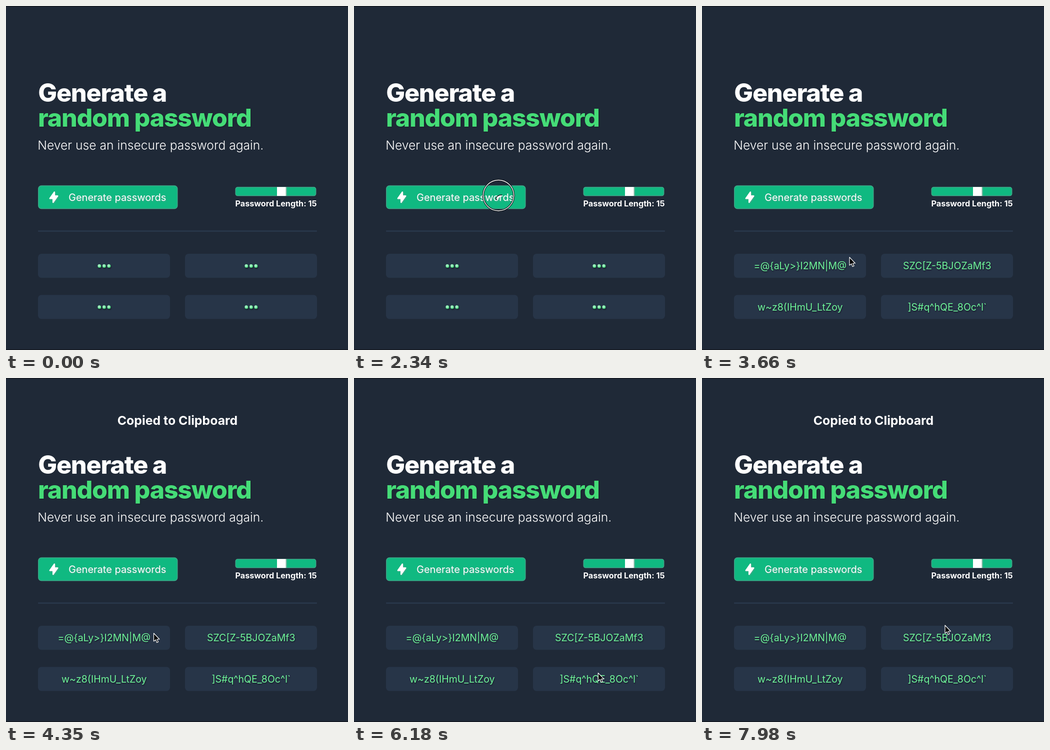
Animation, 684 px wide and 690 px high, one loop 8000 ms. Source, as an HTML page:

```html
<!DOCTYPE html>
<html lang="en">
<head>
<meta charset="utf-8">
<title>Random password</title>
<style>
  html, body { margin: 0; width: 100%; height: 100%; overflow: hidden; background: #1f2937; }
  svg { display: block; width: 100%; height: 100%; }
  text { font-family: Inter, sans-serif; fill: #fff; white-space: pre; }
  .title { font-size: 50.3px; font-weight: 800; letter-spacing: -0.025em; }
  .accent { font-size: 50px; fill: #45dc77; filter: drop-shadow(1px 1px 1px rgba(0, 0, 0, .25)); }
  .sub { font-size: 24.65px; font-weight: 300; }
  .action { filter: drop-shadow(1.5px 1.5px 1px rgba(130, 150, 150, .6)); }
  .action text { font-size: 20px; }
  .label { font-size: 16.2px; font-weight: 700; text-anchor: middle; }
  .toast { font-size: 24.85px; font-weight: 700; text-anchor: middle; }
  .pass { font-size: 19.55px; fill: #6ff59a; text-anchor: middle; }
  .glow { filter: drop-shadow(1.5px 2px 1px rgba(0, 0, 0, .4)); }
  .panel { fill: #10b981; stroke: #3fa587; stroke-width: 1.5; }
</style>
</head>
<body>
<svg viewBox="0 0 684 690">
  <rect width="684" height="690" fill="#1f2937"/>
  <rect width="684" height="1.3" fill="#11161e"/>
  <rect y="688.7" width="684" height="1.3" fill="#11161e"/>

  <text id="toast" class="toast" x="343" y="94" opacity="0">Copied to Clipboard</text>
  <text class="title" x="64.3" y="191.6">Generate a</text>
  <text class="title accent" x="64" y="242">random password</text>
  <text class="sub" x="63.3" y="288">Never use an insecure password again.</text>

  <rect class="panel" x="64.8" y="360.5" width="278" height="46" rx="6"/>
  <g class="action">
    <path transform="translate(82.7 370.7) scale(1.28)" fill="#fff" d="M11.3 1A1 1 0 0 1 12 2v5h4a1 1 0 0 1 .8 1.6l-7 10A1 1 0 0 1 8 18v-5H4a1 1 0 0 1-.8-1.6l7-10a1 1 0 0 1 1.1-.4z"/>
    <text x="125" y="390.8">Generate passwords</text>
  </g>

  <rect class="panel" x="459.2" y="363.6" width="160.5" height="17" rx="4"/>
  <rect x="559" y="363" width="2.5" height="18" fill="#7fb5a2"/>
  <rect x="542" y="363" width="17.5" height="18" fill="#fff"/>
  <text class="label" x="540" y="401.8">Password Length: 15</text>

  <rect x="64" y="450" width="558" height="3" rx="1" fill="#283649"/>
  <g id="cards"></g>

  <g id="ring" fill="none" display="none">
    <circle r="30.7" stroke="#0b0f14" stroke-width="3.6"/>
    <circle r="30.7" stroke="#fff" stroke-width="1.4"/>
  </g>
  <path id="arrow" display="none" stroke="#fff" stroke-width="1.2" stroke-linejoin="round"
    d="M0 0V16L4 13L6 18.6L9 17.5L6.5 12H11.4Z"/>
  <path id="hand" display="none" fill="#fff" stroke="#000" stroke-width="1.1" stroke-linejoin="round"
    d="M-3 9L-5 7Q-4-1 7-1.4 7L-2.2 2Q-1-2 .8 2L1.5 5Q3 3 4.2 5.3Q6 4 6.8 6.3Q9 5 9.4 9Q9.4 12 8 16H1.2Q-1 12-3 9Z"/>
</svg>
<script>
const LOOP = 8000, STEP = 30;
const $ = id => document.getElementById(id);
const NS = 'http://www.w3.org/2000/svg';

function add(parent, tag, attrs, text) {
  const el = document.createElementNS(NS, tag);
  for (const k in attrs) el.setAttribute(k, attrs[k]);
  if (text) el.textContent = text;
  parent.appendChild(el);
  return el;
}

const words = ['=@{aLy>}I2MN|M@', 'SZC[Z-5BJOZaMf3', 'w~z8(IHmU_LtZoy', ']S#q^hQE_8Oc^l`'];
const cards = words.map((word, i) => {
  const x = i % 2 ? 358 : 64, y = i < 2 ? 497 : 579.5, mid = x + 132;
  const g = $('cards');
  add(g, 'rect', { x, y, width: 264, height: 48.3, rx: 7, fill: '#273548' });
  const dots = add(g, 'g', { class: 'glow' });
  for (const dx of [-9.5, 0, 9.5]) {
    add(dots, 'circle', { cx: mid + dx + .4, cy: y + 24.4, r: 3.5, fill: '#4ade80' });
    add(dots, 'circle', { cx: mid + dx - .2, cy: y + 23.7, r: 2.6, fill: '#9debbd' });
  }
  const text = add(g, 'text', { class: 'pass glow', x: mid + .3, y: y + 31.4 }, word);
  return { dots, text };
});

// Pointer stops: each move runs from the stop before
const ENTER = 990, HOLD = 120, FADE = 300;
const home = { x: 690, y: 440 };
const stops = [
  { start: 960, end: 1230, x: 585, y: 422 },
  { start: 1470, end: 2130, x: 289, y: 380 },
  { start: 2850, end: 3660, x: 295, y: 504 },
  { start: 3930, end: 4350, x: 295.5, y: 512 },
  { start: 5520, end: 6330, x: 490, y: 592 },
  { start: 6480, end: 6750, x: 491, y: 602.5 },
  { start: 6900, end: 7650, x: 510, y: 476 },
  { start: 7710, end: 7980, x: 486, y: 496 }
];
const [press, ...copies] = [2340, 3690, 6360];
const TOAST = 2000;

const ramp = (t, from, span) => Math.max(0, Math.min(1, (t - from) / span));
const smooth = p => p * p * (3 - 2 * p);
const glide = p => 1 - (1 - smooth(p)) ** 2;
const show = (el, on) => el.setAttribute('display', on ? 'inline' : 'none');
const place = (el, x, y) => el.setAttribute('transform', `translate(${x} ${y})`);

// Every move bows a little to its right, as a wrist does
function pointer(t) {
  let i = 0;
  while (i + 1 < stops.length && t >= stops[i + 1].start) i++;
  const a = i ? stops[i - 1] : home, b = stops[i];
  const p = glide(ramp(t, b.start, b.end - b.start));
  const bow = .07 * Math.sin(Math.PI * p), dx = b.x - a.x, dy = b.y - a.y;
  return [a.x + dx * p - dy * bow, a.y + dy * p + dx * bow];
}

function draw(time) {
  const t = Math.floor(time / STEP) * STEP;
  const [x, y] = pointer(t);
  const seen = t >= ENTER;
  const onButton = x > 64 && x < 343 && y > 360 && y < 407;
  for (const id of ['arrow', 'hand', 'ring']) place($(id), x, y);
  show($('arrow'), seen && !onButton);
  show($('hand'), seen && onButton);
  show($('ring'), [press, ...copies].some(c => t >= c && t < c + HOLD));

  const ready = t >= press + HOLD;
  for (const c of cards) {
    show(c.dots, !ready);
    show(c.text, ready);
  }
  const fades = copies.map(c => ramp(t, c + HOLD, FADE) - ramp(t, c + HOLD + TOAST, FADE));
  $('toast').setAttribute('opacity', smooth(Math.max(...fades)));
}

const start = performance.now();
function tick() {
  draw((performance.now() - start) % LOOP);
  requestAnimationFrame(tick);
}
tick();
</script>
</body>
</html>
```
